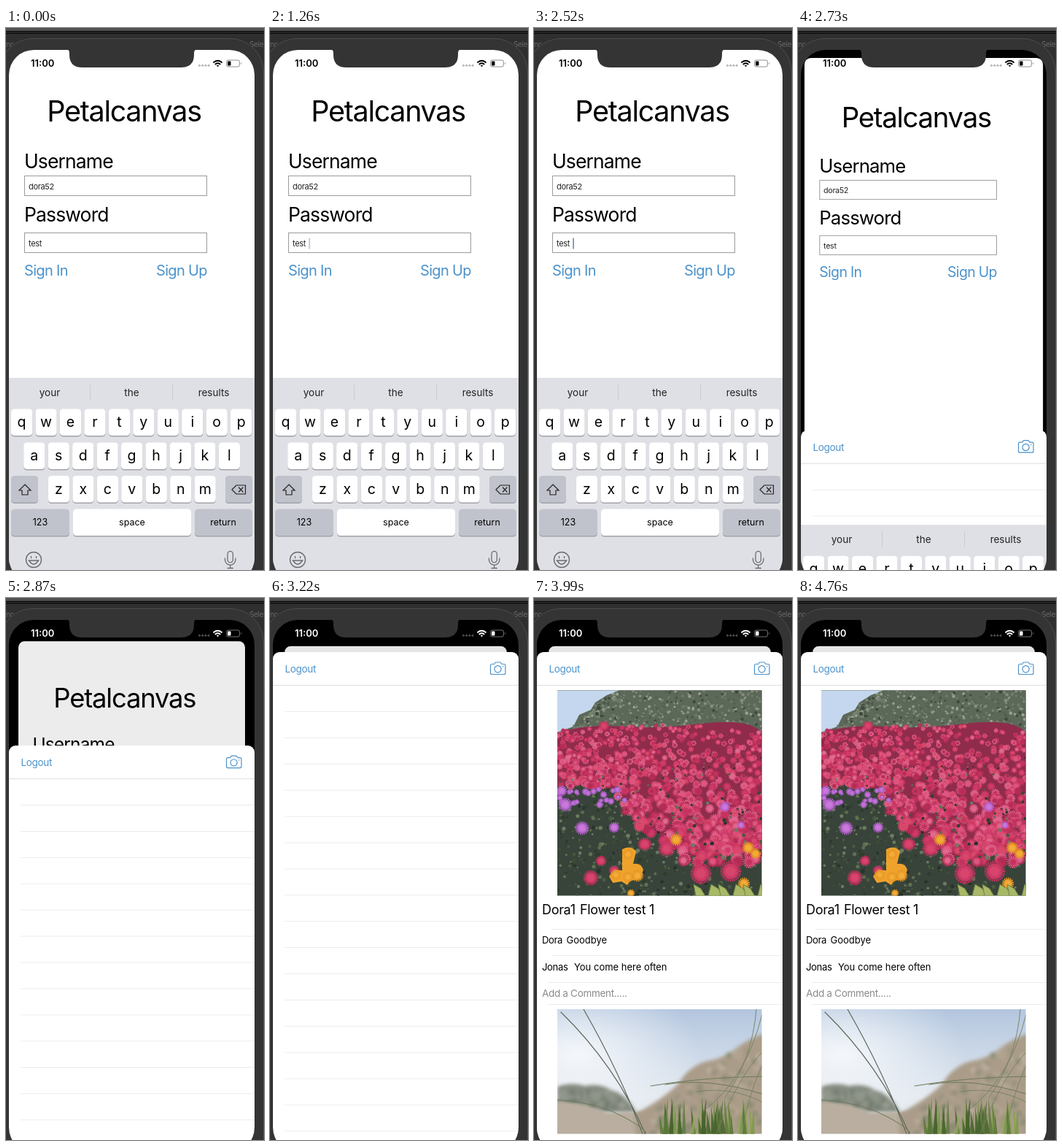
These frames come from a looping animation (354x742 px, 4830 ms). An HTML page:

```html
<!DOCTYPE html>
<html lang="en">
<head>
<meta charset="utf-8">
<title>Sign in and feed</title>
<style>
html, body { margin: 0; width: 100%; height: 100%; overflow: hidden; background: #2f2f2f; }
svg { display: block; font-family: Inter, "Liberation Sans", sans-serif; letter-spacing: -.02em; }
.mid { text-anchor: middle; letter-spacing: 0; }
.tight { letter-spacing: -.033em; }
.loose { letter-spacing: 0; }
.link { fill: #4b92cb; }
.line { fill: none; stroke-linecap: round; }
</style>
</head>
<body>
<svg id="stage" width="354" height="742" viewBox="0 0 354 742"></svg>
<script>
const LOOP = 4830, RISE = 2652, SETTLED = 3220, LOADED = 3500;

let seed = 11;
const rnd = (a = 0, b = 1) => {
  seed = (seed * 16807) % 2147483647;
  return a + (b - a) * seed / 2147483647;
};
const pick = list => list[Math.floor(rnd(0, list.length))];
const many = (n, make) => Array.from({ length: n }, (_, i) => make(i)).join('');

const text = (x, y, size, str, attr = '') =>
  `<text x="${x}" y="${y}" font-size="${size}" ${attr}>${str}</text>`;
const rect = (x, y, w, h, fill, attr = '') =>
  `<rect x="${x}" y="${y}" width="${w}" height="${h}" fill="${fill}" ${attr}/>`;
const path = (d, attr) => `<path d="${d}" ${attr}/>`;
const stroke = (d, color, width = 1) =>
  path(d, `class="line" stroke="${color}" stroke-width="${width}"`);
const dot = (x, y, r, fill, attr = '') =>
  `<circle cx="${x.toFixed(1)}" cy="${y.toFixed(1)}" r="${r.toFixed(1)}" fill="${fill}" ${attr}/>`;
const bloom = (x, y, r, fill, rim = fill) =>
  dot(x, y, r * .75, fill, `stroke="${rim}" stroke-width="${(r * .55).toFixed(1)}" stroke-dasharray="1.4 .9"`);
const blur = (size, content) => `<g filter="url(#blur${size})">${content}</g>`;

function login() {
  const field = (y, str) =>
    rect(25.5, y + .5, 250, 27, '#fff', 'stroke="#9b9b9b"') + text(31, y + 18.5, 11, str, 'fill="#222"');
  return rect(4, 30, 337, 729, '#fff', 'rx="9"') +
    text(162, 128, 39.5, 'Petalcanvas', 'class="tight" text-anchor="middle"') +
    text(25, 192, 26.5, 'Username', 'class="tight"') + field(202, 'dora52') +
    text(25, 265, 26.5, 'Password', 'class="tight"') + field(280, 'test') +
    rect(53.4, 287.5, 1.3, 15, '#4a6a9c', 'id="caret"') +
    text(25, 339, 20, 'Sign In', 'class="link tight"') +
    text(206, 339, 20, 'Sign Up', 'class="link tight"') +
    rect(4, 30, 337, 729, '#000', 'id="dim" rx="9"');
}

function keyboard() {
  const key = (x, y, w, fill = '#fff') =>
    rect(x, y + 1, w, 37, '#a2a4aa', 'rx="4.5"') + rect(x, y, w, 36.5, fill, 'rx="4.5"');
  const row = (letters, cx, y) => many(letters.length, i => {
    const x = cx + i * 33.45;
    return key(x - 14.6, y, 29.2) + text(x, y + 24.5, 19.5, letters[i], 'class="mid"');
  });
  const grey = '#c1c3cc';
  return rect(4, 479, 337, 290, '#dfe0e5') +
    ['your', 'the', 'results'].map((w, i) => text(60 + i * 112.5, 504, 13.5, w, 'class="mid" fill="#222"')).join('') +
    stroke('M115.5 488v21M228.5 488v21', '#cbccd2') +
    row('qwertyuiop', 21.6, 521.5) + row('asdfghjkl', 38.8, 567.5) + row('zxcvbnm', 72.5, 613) +
    key(7, 613, 37, grey) + key(301, 613, 37, grey) +
    key(7, 658.5, 80, grey) + key(92, 658.5, 162) + key(259, 658.5, 79, grey) +
    text(47, 681, 12.5, '123', 'class="mid"') + text(173, 681, 12.5, 'space', 'class="mid"') +
    text(298, 681, 12.5, 'return', 'class="mid"') +
    stroke('M26 625l8 8h-4v6h-8v-6h-4zM316 626h12.5v12h-12.5l-6-6zM319.5 629l5.5 6M325 629l-5.5 6', '#222', 1.2) +
    stroke('M27.5 728a10.5 10.5 0 1 1 21 0a10.5 10.5 0 1 1-21 0M31.5 729q6.5 10 13 0zM34.5 723.5v2M41.5 723.5v2', '#6b6d72', 1.4) +
    stroke('M304 720a3.7 3.7 0 0 1 7.4 0v8a3.7 3.7 0 0 1-7.4 0zM300.5 726v2a7.2 7.2 0 0 0 14.4 0v-2M307.7 735.5v4M304 739.5h7.4', '#6b6d72', 1.3);
}

function flowers() {
  const pinks = ['#cf3a67', '#c43360', '#de5580', '#b32c55', '#d8476a', '#e0698f'];
  const greens = ['#2f3d2b', '#4a5a40', '#5f6f52', '#27332a', '#6c7a62', '#3c4c38'];
  const bush = ['#6f7a6c', '#566153', '#87907f', '#3f4a3f', '#778270', '#98a08f'];
  const lower = x => x < 112 ? 258 : Math.min(362, 285 + (x - 112) * .9);
  return `<g clip-path="url(#photo1)">` +
    rect(32, 126, 281, 282, '#38443a') +
    rect(32, 126, 281, 62, '#5c6858') +
    many(520, () => dot(rnd(60, 313), rnd(126, 190), rnd(.8, 2.3), pick(bush))) +
    path('M32 126H118L100 133 84 143 78 153 62 160 54 176 32 184z', 'fill="#c4d7ee"') +
    many(60, () => {
      const x = rnd(52, 116);
      return dot(x, 178 - (x - 52) * .72 + rnd(-3, 9), rnd(1, 2.8), pick(bush));
    }) +
    many(480, () => dot(rnd(32, 313), rnd(255, 408), rnd(.8, 2.8), pick(greens))) +
    path('M32 184Q75 172 120 176T230 172 313 184V352L250 345 200 340 150 312 112 262 32 252z', 'fill="#8f2c4c"') +
    many(640, i => {
      const x = rnd(32, 313), top = 182 - 8 * Math.sin((x - 32) / 90);
      const y = top + (lower(x) - top) * i / 640;
      return bloom(x, y, 3 + (y - 175) / 36, pick(pinks), pick(pinks));
    }) +
    many(170, () => {
      const y = rnd(215, 362);
      return dot(rnd(32, 313), y, rnd(.8, 1 + (y - 200) / 65), pick(greens));
    }) +
    many(26, () => bloom(rnd(34, 125), rnd(262, 284), rnd(2.5, 5), '#c274d8', '#a95cc4')) +
    [[43, 283, 9], [66, 315, 9], [110, 314, 7], [38, 264, 7], [262, 286, 7], [284, 311, 5]]
      .map(f => bloom(...f, '#c878d8', '#b35fcb')).join('') +
    [[78, 383, 10], [110, 373, 7], [92, 360, 7], [229, 377, 14], [270, 374, 14], [182, 343, 11], [152, 337, 9], [96, 175, 7]]
      .map(f => bloom(...f, '#d8456c', '#c63260')).join('') +
    path('M121 344q12-6 19 3l-4 17q11-2 14 8l-4 13-14 2-4 6-8-5-12 2-5-9 8-9 10 1z', 'fill="#f0a32c"') +
    [[195, 331, 8], [294, 342, 8], [304, 350, 7], [142, 380, 8], [129, 351, 7], [288, 391, 8], [112, 379, 7], [129, 382, 7], [133, 404, 5]]
      .map(f => bloom(...f, '#f2ac38', '#e59524')).join('') +
    many(6, i => path(`M${222 + i * 17} 408l${i % 2 ? 4 : -3}-16 10 6 6 10z`, 'fill="#a9b866" stroke="#6f8244"')) +
    '</g>';
}

function dunes() {
  const hill = ['#a89a88', '#b8a996', '#8b8a74', '#9a9282', '#7d8468', '#c2b4a4'];
  const bushes = path('M32 669q20-7 38-1 22-4 36 6 20 4 34 30H32z', 'fill="#858b80"') +
    many(70, () => dot(rnd(32, 122), rnd(674, 702), rnd(2, 5), pick(['#737c70', '#8f968a', '#9d9f94'])));
  const slope = path('M320 594q-29 11-45 24t-42 17q-24 10-34 29-22 22-60 42v34h181z', 'fill="#aa9c89"') +
    many(190, () => {
      const x = rnd(160, 313);
      return dot(x, rnd(Math.max(612, 720 - (x - 145) * .78), 734), rnd(1.5, 5), pick(hill), 'opacity=".8"');
    });
  return `<g clip-path="url(#photo2)">` +
    rect(32, 563, 281, 171, 'url(#sky)') + rect(32, 563, 281, 171, 'url(#glow)') +
    blur(3, bushes) +
    blur(2, path('M28 689q44 2 70 16l34-1 38-2v38H28z', 'fill="#b9ae9f"')) +
    blur(3, slope) +
    many(60, () => {
      const x = rnd(168, 300), y = rnd(682, 712);
      return path(`M${x - 3} 735L${x + rnd(-5, 5)} ${y}L${x + 3} 735z`,
        `fill="${pick(['#5d7a3c', '#7f994f', '#48632f', '#96a65f'])}" opacity=".85"`);
    }) +
    stroke('M37 567Q112 640 153 734M68 563Q118 650 149 734', '#5f695c', 1.2) +
    stroke('M32 687Q88 690 126 712T150 734M313 655Q230 656 160 668M313 679Q240 656 180 666', '#6b7858') +
    stroke('M313 570Q290 660 235 700M305 563Q300 630 262 684M313 622Q280 655 250 734M313 690Q270 668 222 676M313 640Q290 690 286 734', '#74805f', .9) +
    '</g>';
}

function feed() {
  return rect(4, 46.5, 337, 700, '#fff') + `<g transform="translate(0 -74)">` + flowers() +
    text(11, 433, 18, 'Dora1') + text(63, 433, 18, 'Flower test 1') +
    text(11, 473, 13, 'Dora') + text(44.5, 473, 13, 'Goodbye', 'class="loose"') +
    text(11, 510, 13, 'Jonas') + text(55, 510, 13, 'You come here often', 'class="loose"') +
    text(11, 546, 13.5, 'Add a Comment.....', 'fill="#8a8a8a"') +
    stroke('M24 453.5H341M24 489.5H341M19 526.5H341M19 556.5H341', '#ececec') +
    dunes() + '</g>';
}

// Sheet coordinates start at its own top edge.
function sheet() {
  return rect(4, 0, 337, 760, '#fff', 'rx="9"') +
    `<g id="rows">${many(18, i => stroke(`M20.5 ${(81.5 + i * 35.9).toFixed(1)}H341`, '#ececec'))}</g>` +
    `<g id="feed">${feed()}</g>` +
    stroke('M4 45.5H341', '#dedede') +
    text(20.5, 28, 13.5, 'Logout', 'class="link"') +
    stroke('M304.5 16.5h3l2-2.5h6.5l2 2.5h3q2 0 2 2v10q0 2-2 2h-16.5q-2 0-2-2v-10q0-2 2-2zM308 23.3a4.6 4.6 0 1 1 9.2 0a4.6 4.6 0 1 1-9.2 0M319.5 19.8h.5', '#4b92cb', 1.2);
}

function statusBar() {
  return text(34, 53, 13, '11:00', 'class="loose" font-weight="600" fill="currentColor"') +
    many(4, i => dot(265.5 + i * 4.2, 51.3, 1.5, 'currentColor', 'opacity=".3"')) +
    stroke('M285 47q5.5-4.5 11 0M287.3 49.5q3.2-2.5 6.4 0', 'currentColor', 1.9) +
    path('M288.7 51.3q1.8-1.3 3.6 0l-1.8 2z', 'fill="currentColor"') +
    rect(302.5, 44, 18, 9, 'none', 'rx="2.5" stroke="currentColor" opacity=".45"') +
    rect(304, 45.5, 4.5, 6, 'currentColor', 'rx="1"') +
    path('M322 47q2 1.5 0 3z', 'fill="currentColor" opacity=".45"');
}

const stage = document.getElementById('stage');
stage.innerHTML = `<defs>
  <clipPath id="screen"><rect x="4" y="30" width="337" height="729" rx="34"/></clipPath>
  <clipPath id="photo1"><rect x="32" y="126.5" width="280.5" height="281"/></clipPath>
  <clipPath id="photo2"><rect x="32" y="563" width="280.5" height="170.5"/></clipPath>
  <filter id="blur2"><feGaussianBlur stdDeviation="1.5"/></filter>
  <filter id="blur3"><feGaussianBlur stdDeviation="2.5"/></filter>
  <linearGradient id="sky" x2="0" y2="1"><stop stop-color="#b3c6df"/><stop offset=".7" stop-color="#e3e9f0"/></linearGradient>
  <radialGradient id="glow" cx=".1" cy=".35" r=".6"><stop stop-color="#fff" stop-opacity=".8"/><stop offset="1" stop-color="#fff" stop-opacity="0"/></radialGradient>
  </defs>` +
  rect(0, 0, 354, 742, '#2f2f2f') + rect(0, 0, 354, 4, '#505250') +
  rect(0, 4, 354, 4, '#0c0c0c') + rect(0, 5.5, 354, 1, '#3c3c3c') +
  text(0, 26, 10, 'nc', 'fill="#6a6a6a"') + text(334, 26, 10, 'Sele', 'fill="#6a6a6a"') +
  rect(-9, 14.5, 362.5, 800, '#343434', 'rx="46" stroke="#4c4c4c"') +
  `<g clip-path="url(#screen)">${rect(4, 30, 337, 729, '#000')}
  <g id="login">${login()}</g><g id="sheet">${sheet()}</g><g id="keys">${keyboard()}</g></g>` +
  path('M82 29q5 0 5 5.5v2q0 17.5 17.5 17.5h136q17.5 0 17.5-17.5v-2q0-5.5 5-5.5z', 'fill="#343434"') +
  `<g id="status">${statusBar()}</g>`;

const ui = {};
for (const id of ['login', 'caret', 'dim', 'sheet', 'rows', 'feed', 'keys', 'status'])
  ui[id] = document.getElementById(id);

const clamp = v => Math.min(1, Math.max(0, v));
const ramp = (t, a, b) => clamp((t - a) / (b - a));
const spring = (ms, rate) => {
  const x = Math.max(0, ms) / 1000 * rate;
  return 1 - (1 + x) * Math.exp(-x);
};
const show = (el, on) => el.setAttribute('visibility', on ? 'visible' : 'hidden');

function draw(t) {
  const p = clamp(spring(t - RISE, 14) / spring(SETTLED - RISE, 14));
  const scale = 1 - .095 * p;
  const blink = ramp(t, 40, 350) - ramp(t, 690, 980) + ramp(t, 1190, 1330) -
    ramp(t, 1600, 1960) + ramp(t, 2090, 2400);
  ui.caret.setAttribute('opacity', t < RISE ? blink : 0);
  ui.login.setAttribute('transform', `translate(172.5 ${30 + 36 * p}) scale(${scale}) translate(-172.5 -30)`);
  ui.dim.setAttribute('opacity', .1 * ramp(p, .3, 1));
  ui.sheet.setAttribute('transform', `translate(0 ${759 - 685 * p})`);
  ui.keys.setAttribute('transform', `translate(0 ${280 * spring(t - RISE, 32)})`);
  show(ui.keys, t < SETTLED);
  show(ui.rows, t < LOADED);
  show(ui.feed, t >= LOADED);
  const tone = Math.round(255 * ramp(p, .32, .8));
  ui.status.style.color = `rgb(${tone},${tone},${tone})`;
}

function tick() {
  draw(performance.now() % LOOP);
  requestAnimationFrame(tick);
}
tick();
</script>
</body>
</html>
```
